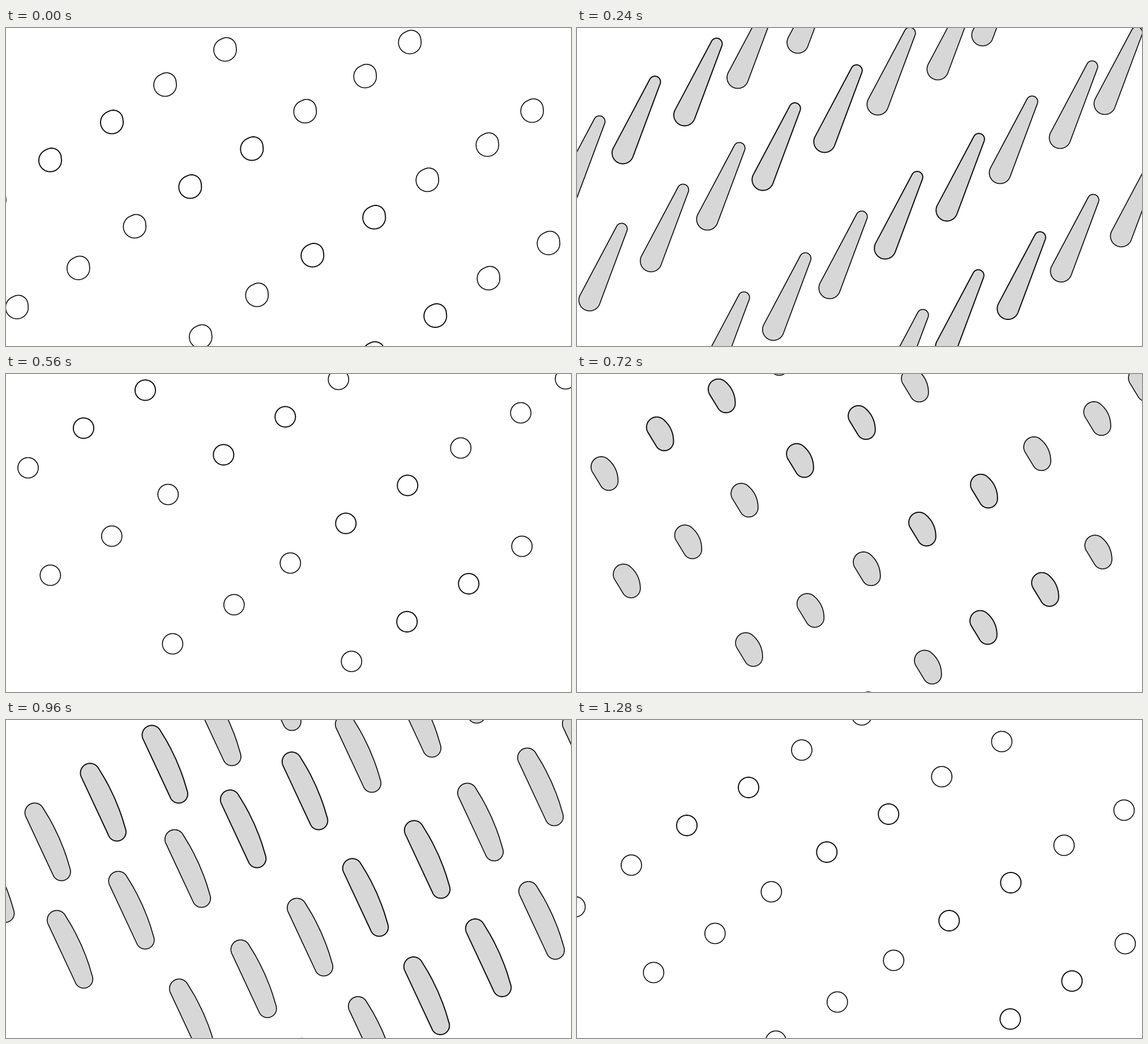
Animation of 998 by 561 pixels, one loop 1360 ms. Source, as an HTML page:

```html
<!DOCTYPE html>
<html lang="en">
<head>
<meta charset="utf-8">
<title>Stretching drops</title>
<style>
  html, body { margin: 0; width: 100%; height: 100%; overflow: hidden; background: #fff; }
  svg { display: block; width: 998px; height: 561px; }
  #drops { stroke: #0c0c0c; stroke-linejoin: round; }
</style>
</head>
<body>
<svg viewBox="0 0 998 561">
  <defs><path id="drop"/></defs>
  <g id="drops"></g>
</svg>
<script>
const STEP = 80, LOOP = 1360;

// Every row repeats the same uneven diagonal.
const rows = [[187, 165.5], [434.3, 212.5], [650.3, 333.5], [758.3, 507]];
const diagonal = [
  [279, -188], [200, -128], [94, -66], [0, 0],
  [-109, 67], [-207, 137], [-306.5, 210.5], [-415, 279.5]
];

// A drop is a head circle and a tail circle (x, y, radius) wrapped in one skin;
// bow bends the body to the right, ease shapes the way to the next pose.
const poses = [
  { at: 0, head: [2.5, -3.5, 17], tail: [0, 1, 20], bow: 0, ease: 1 },
  { at: 240, head: [59.5, -137.5, 10], tail: [3, -12, 19], bow: 0, ease: 0.85 },
  { at: 560, head: [59, -137, 18], tail: [59, -137, 18], bow: 5.5, ease: 1.5 },
  { at: 800, head: [66, -140, 18], tail: [90.5, -94, 15], bow: 4, ease: 1 },
  { at: 960, head: [70.5, -139, 17], tail: [118, -35, 16], bow: 4.5, ease: 1 },
  { at: 1280, head: [116, -46.5, 18], tail: [116, -46.5, 18], bow: 0, ease: 1 }
];

const drop = document.getElementById('drop');
const group = document.getElementById('drops');
for (const [x, y] of rows) {
  diagonal.forEach(([dx, dy], i) => {
    const use = document.createElementNS('http://www.w3.org/2000/svg', 'use');
    use.setAttribute('href', '#drop');
    use.setAttribute('x', x + dx);
    use.setAttribute('y', y + dy);
    use.setAttribute('stroke-width', 1.65 + 0.4 * Math.exp(-((i - 3.5) ** 2)));
    group.append(use);
  });
}

const mix = (a, b, k) => a + (b - a) * k;
const mixAll = (a, b, k) => a.map((v, i) => mix(v, b[i], k));

function poseAt(time) {
  const i = poses.findLastIndex(p => p.at <= time);
  const a = poses[i], b = poses[i + 1] || a;
  const k = a === b ? 0 : ((time - a.at) / (b.at - a.at)) ** a.ease;
  return {
    head: mixAll(a.head, b.head, k),
    tail: mixAll(a.tail, b.tail, k),
    bow: mix(a.bow, b.bow, k)
  };
}

const gapOf = ({ head, tail }) => Math.hypot(head[0] - tail[0], head[1] - tail[1]);

// Convex skin around circles strung along the bent body.
function skin(pose) {
  const { head, tail, bow } = pose;
  const gap = gapOf(pose) || 1;
  const bend = bow * Math.min(1, gap / 40);
  const side = [(tail[1] - head[1]) / gap, (head[0] - tail[0]) / gap];
  const circles = Array.from({ length: 17 }, (_, i) => {
    const k = i / 16, push = bend * 4 * k * (1 - k);
    const [x, y, r] = mixAll(tail, head, k);
    return [x + side[0] * push, y + side[1] * push, r];
  });
  const points = Array.from({ length: 120 }, (_, i) => {
    const angle = i / 120 * 2 * Math.PI;
    const c = Math.cos(angle), s = Math.sin(angle);
    const reach = ([x, y, r]) => x * c + y * s + r;
    const [x, y, r] = circles.reduce((a, b) => reach(b) > reach(a) ? b : a);
    return `${(x + r * c).toFixed(2)},${(y + r * s).toFixed(2)}`;
  });
  return 'M' + points.join('L') + 'Z';
}

let shown = -1;
function draw(now) {
  const time = Math.floor(now % LOOP / STEP) * STEP;
  if (time !== shown) {
    shown = time;
    const pose = poseAt(time);
    drop.setAttribute('d', skin(pose));
    group.setAttribute('fill', gapOf(pose) < 8 ? '#fff' : '#d7d7d7');
  }
  requestAnimationFrame(draw);
}
draw(performance.now());
</script>
</body>
</html>
```
